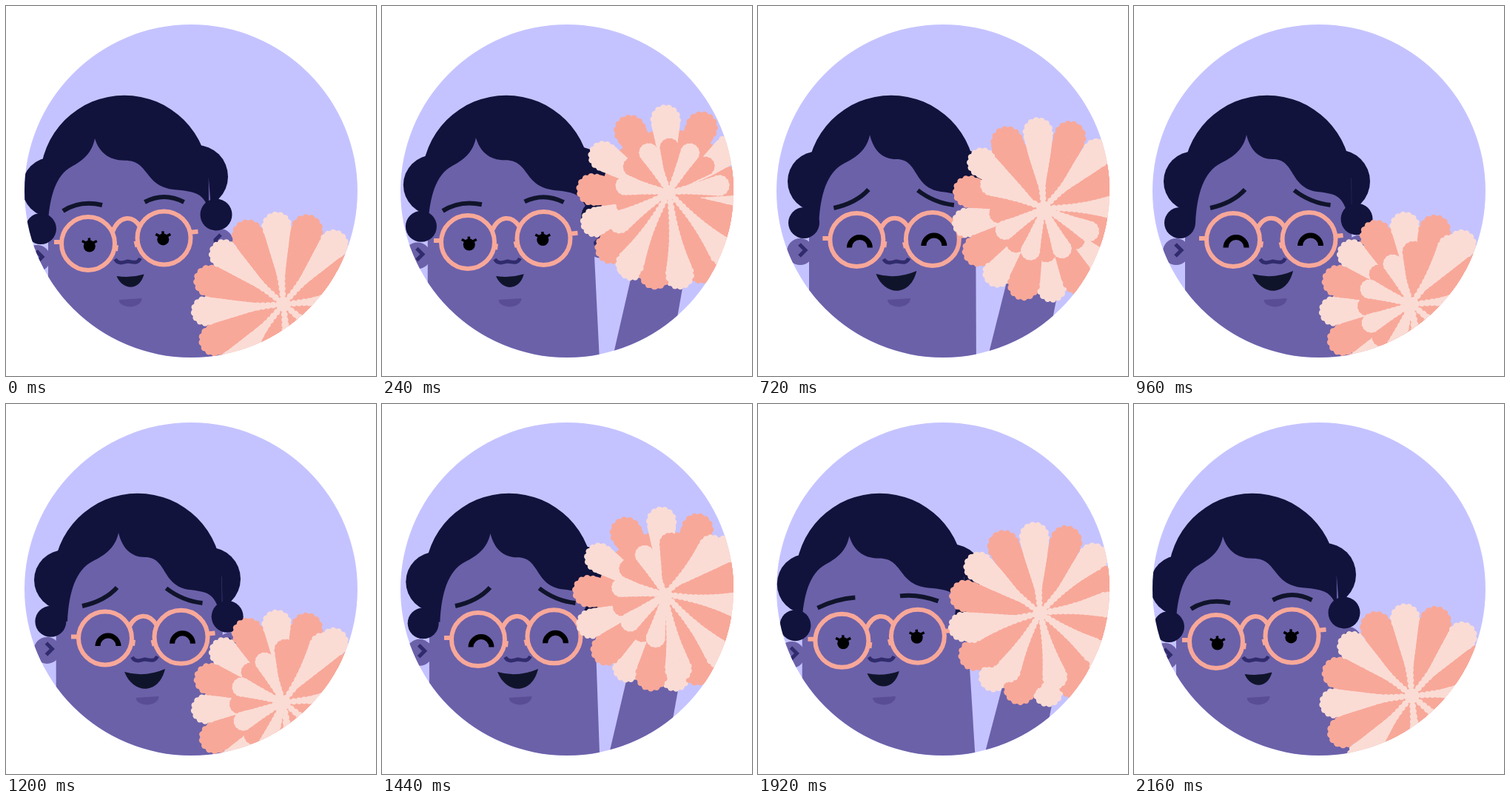
Write an HTML page with a canvas that moves like this. It is 500 px wide and 500 px high and loops after 2.24 s.

```html
<!DOCTYPE html>
<html lang="en">
<head>
<meta charset="utf-8">
<title>Dancer with pompom</title>
<style>
html, body { margin: 0; width: 100%; height: 100%; overflow: hidden; background: #fff; }
canvas { display: block; width: 500px; height: 500px; }
</style>
</head>
<body>
<canvas id="stage" width="500" height="500"></canvas>
<script>
const ctx = document.getElementById('stage').getContext('2d');
const LOOP = 2240, STEP = 80, TAU = Math.PI * 2, DEG = TAU / 360;
const SKY = '#c5c3ff', SKIN = '#6b61a9', HAIR = '#11133c', INK = '#10142b',
      CREASE = '#302b6c', SHADE = '#594e95', PEACH = '#f8a899', PALE = '#fadcd5';

const mix = (a, b, k) => a + (b - a) * k;
const clamp = v => Math.max(0, Math.min(1, v));
const smooth = v => { v = clamp(v); return v * v * (3 - 2 * v); };
const ease = (t, from, to) => smooth((t - from) / (to - from));
const pulse = (t, a, b, c, d) => ease(t, a, b) - ease(t, c, d);

// Motion: every part is a sum of eased moves
const firstLift = t => pulse(t, 0, 312, 600, 960);
const secondLift = t => pulse(t, 1200, 1524, 1740, 2225);
const lift = t => firstLift(t) + secondLift(t);

function poseAt(t) {
  const up = lift(t);
  return {
    turn: ease(t, 0, 560) - 0.65 * ease(t, 1020, 1720) - 0.35 * ease(t, 1760, 2160),
    gaze: pulse(t, 0, 800, 1200, 2100),
    joy: pulse(t, 180, 700, 1560, 2160),
    squint: pulse(t, 240, 400, 1680, 1840),
    pomX: 375 + 15 * firstLift(t) + 9 * secondLift(t),
    pomY: 403 - 175 * up,
    spread: 6 * up + 25 * Math.max(0, up - lift(t - STEP)),
    open: pulse(t, 0, 240, 1680, 2100),
    lean: -290 * ease(t, 240, 960) - 240 * ease(t, 1440, 1760)
  };
}

function disc(x, y, r, color) {
  ctx.fillStyle = color;
  ctx.beginPath();
  ctx.arc(x, y, r, 0, TAU);
  ctx.fill();
}

function shape(color, ...pts) {
  ctx.fillStyle = color;
  ctx.beginPath();
  pts.forEach(p => ctx.lineTo(...p));
  ctx.fill();
}

function line(color, width, draw) {
  ctx.strokeStyle = color;
  ctx.lineWidth = width;
  ctx.beginPath();
  draw();
  ctx.stroke();
}

function ear(x, y, side) {
  disc(x, y, 18, SKIN);
  line(CREASE, 5, () => {
    ctx.moveTo(x - side, y - 10);
    ctx.lineTo(x + side * 7, y - 2);
    ctx.lineTo(x - side, y + 6);
  });
}

function drawHead({ turn, gaze }) {
  const k = 20 * (turn - 1), d = 180 + k, away = 1 - gaze;
  const left = 69 + 0.6 * k, right = 294 + k;
  disc(80.5 + 0.92 * k, 237 - 0.4 * k, 40.5, HAIR);
  disc(276.5 + 0.95 * k, 237 + 0.33 * k, 42.5, HAIR);
  ear(57 + 0.75 * k, 332 - 0.45 * k, 1);
  ear(304 + 0.75 * k, 328 + 0.45 * k, -1);
  shape(SKIN, [left, 234], [d - 85, 172], [d + 85, 172], [right, 234], [295, 500], [left, 500]);

  // Hairline is drawn around its peak; each side stretches as the head turns
  const px = 120 + 32 * gaze, py = 179 - 5 * gaze;
  const side = (sx, sy) => (...c) =>
    ctx.bezierCurveTo(...c.map((v, i) => i % 2 ? py + v * sy : px + v * sx));
  const lobe = side(1 - 0.08 * away, 1), wave = side(1 + 0.13 * away, 1 - 0.1 * away);
  ctx.fillStyle = HAIR;
  ctx.beginPath();
  ctx.arc(d, 234.5, 113.8, 0, Math.PI, true);
  ctx.lineTo(left, 290);
  ctx.lineTo(px - 69 * (1 - 0.08 * away), py + 120);
  lobe(-67, 80, -58, 50, -34, 38);
  lobe(-18, 30, -4, 20, 0, 0);
  wave(5, 20, 16, 33, 36, 33);
  wave(66, 33, 58, 72, 96, 77);
  wave(124, 80, 128, 84, 136, 104);
  ctx.lineTo(right, 280);
  ctx.fill();
  disc(62 + 0.75 * k, 293 - 0.4 * k, 21, HAIR);
  disc(301 + 0.85 * k, 288 + 0.3 * k, 21.5, HAIR);
}

function openEye(x, y) {
  disc(x, y, 8, '#000');
  line('#000', 3.5, () => {
    ctx.moveTo(x, y - 5); ctx.lineTo(x - 0.5, y - 11);
    ctx.moveTo(x - 4, y - 4); ctx.lineTo(x - 10, y - 7);
    ctx.moveTo(x + 4, y - 4); ctx.lineTo(x + 10, y - 7);
  });
}

function shutEye(x, y, k) {
  line('#000', 7, () => ctx.ellipse(x, y, 14, 14 * k, 0, Math.PI, TAU));
}

function brow(x, calm, glad, k) {
  const p = calm.map((v, i) => mix(v, glad[i], k));
  line(INK, 6, () => {
    ctx.moveTo(x + p[0], p[1]);
    ctx.quadraticCurveTo(x + p[2], p[3], x + p[4], p[5]);
  });
}

function drawFace({ turn, gaze, joy, squint }) {
  const k = 20 * (turn - 1), x1 = 111 + 23 * gaze, x2 = x1 + 102.5;
  const y1 = 316 - 0.25 * k, y2 = 315 + 0.08 * k;

  brow(x1, [-34, 277, -11, 262, 19, 269], [-31, 273, 0, 266, 16, 248], joy);
  brow(x2, [-26, 265, 0, 251, 27, 265], [-20, 249, 2, 266, 29, 269], joy);

  if (squint < 0.25) {
    openEye(x1 + 1.8, y1 + 3.5);
    openEye(x2 - 1.2, y2 + 2);
  } else {
    shutEye(x1 + 4, y1 + 10.5, squint);
    shutEye(x2 + 2, y2 + 9, squint);
  }

  const nx = x1 + 53.5;
  line(CREASE, 5, () => {
    ctx.moveTo(nx - 17, 342);
    ctx.bezierCurveTo(nx - 13, 349, nx - 7, 347, nx, 345);
    ctx.bezierCurveTo(nx + 7, 346, nx + 13, 349, nx + 17, 341);
  });

  line(PEACH, 6, () => {
    ctx.arc(x1, y1, 36, 0, TAU);
    ctx.moveTo(x2 + 36, y2);
    ctx.arc(x2, y2, 36, 0, TAU);
    ctx.moveTo(x1 + 33, y1 - 16);
    ctx.bezierCurveTo(x1 + 42, 283, x2 - 43, 282, x2 - 33, y2 - 16);
    ctx.moveTo(x1 - 46, y1 - 2);
    ctx.lineTo(x1 - 36, y1 - 2);
    ctx.moveTo(x2 + 36, y2 - 4 + k * 0.18);
    ctx.lineTo(x2 + 46, y2 - 5 + k * 0.18);
    // nose pads
    ctx.moveTo(x1 + 38, y1 + 2);
    ctx.lineTo(x1 + 37, y1 + 10);
    ctx.moveTo(x2 - 38, y2 + 4);
    ctx.lineTo(x2 - 36, y2 + 12);
  });

  const mx = x1 + 57 - 3.5 * joy, w = 18.5 + 9 * joy;
  const ly = 365 - 3 * joy, ry = 362.5 - 4.5 * joy, deep = 385 + 8 * joy;
  ctx.fillStyle = INK;
  ctx.beginPath();
  ctx.moveTo(mx - w, ly);
  ctx.quadraticCurveTo(mx, 368 + 2 * joy, mx + w, ry);
  ctx.bezierCurveTo(mx + w * 0.7, deep, mx - w * 0.55, deep, mx - w, ly);
  ctx.fill();

  ctx.fillStyle = SHADE;
  ctx.beginPath();
  ctx.ellipse(x1 + 57, 396, 15.5, 10.5, -0.06, 0, Math.PI);
  ctx.fill();
}

// A beaded stem that swells into a scalloped tip; a higher power keeps the stem thin
function petal(x, y, angle, length, r, power, color) {
  const sx = -Math.sin(angle), sy = -Math.cos(angle);
  const beads = Math.round(length / 7);
  for (let i = 0; i < beads; i++) {
    const f = i / beads;
    disc(x + sx * length * f, y + sy * length * f, 4.2 + (r - 4.2) * Math.pow(f, power), color);
  }
  const hx = x + sx * length, hy = y + sy * length;
  disc(hx, hy, r - 1.5, color);
  for (let i = 0; i < 14; i++) {
    const a = angle + i * TAU / 14;
    disc(hx + Math.cos(a) * (r - 4), hy + Math.sin(a) * (r - 4), 4.2, color);
  }
}

function drawPom({ pomX: x, pomY: y, spread, open, lean }) {
  const sag = 0.5 * spread;
  const slot = i => (5 + 22.5 * i) * DEG;
  const drag = a => a + spread * DEG * Math.sin(a - 15 * DEG);
  const eachPetal = (odd, draw) => { for (let i = odd; i < 16; i += 2) draw(slot(i)); };

  disc(x, y + sag, 92, PEACH);
  eachPetal(0, a => petal(x, y + sag, drag(a), 105, 20.5, 1.2, PALE));
  eachPetal(1, a => petal(x, y + sag, drag(a), 104, 22, 1.1, PEACH));

  // Front petals curl inward on the side the pompom leans to
  const front = (a, size, power, color) => {
    const w = open * smooth(0.65 + 0.9 * Math.cos(a - lean * DEG));
    const full = 105 - sag * Math.cos(a);
    petal(x, y, drag(a + 0.35 * w), mix(full, 60, w), mix(size, 13, w), mix(power, 1.3, w), color);
  };
  eachPetal(1, a => front(a, 21.5, 1.1, PEACH));
  eachPetal(0, a => front(a, 19.5, 2.2, PALE));
  disc(x, y, 8, PALE);
}

function draw(t) {
  const pose = poseAt(t), x = pose.pomX;
  ctx.fillStyle = '#fff';
  ctx.fillRect(0, 0, 500, 500);
  ctx.save();
  ctx.beginPath();
  ctx.arc(250, 250, 225, 0, TAU);
  ctx.clip();
  ctx.fillStyle = SKY;
  ctx.fillRect(0, 0, 500, 500);
  drawHead(pose);
  drawFace(pose);
  shape(SKIN, [x - 25, pose.pomY], [x + 41, pose.pomY], [x - 3, 500], [x - 82, 500]);
  drawPom(pose);
  ctx.restore();
}

const start = performance.now();
function tick() {
  const t = Math.max(0, performance.now() - start) % LOOP;
  draw(Math.floor(t / STEP) * STEP);
  requestAnimationFrame(tick);
}
tick();
</script>
</body>
</html>
```
